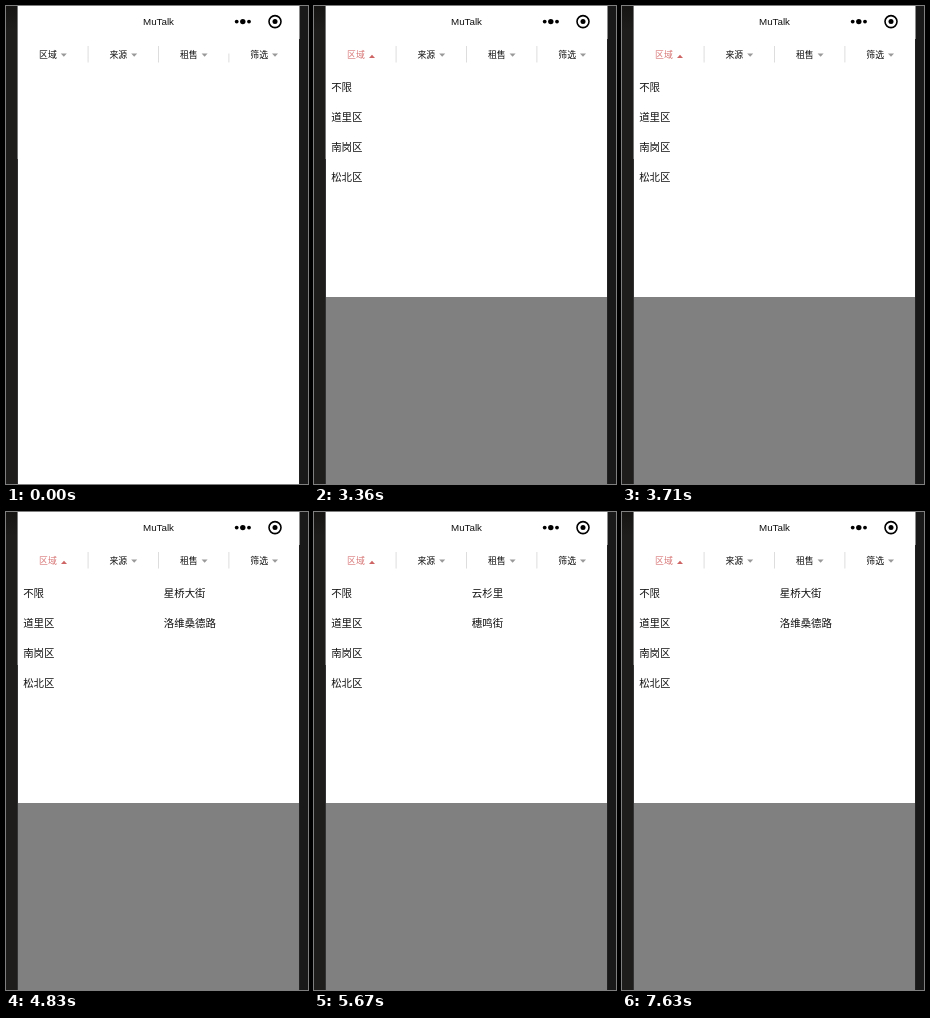
An HTML page that plays this animation: 302x478 px, repeating every 8 s.

```html
<!DOCTYPE html>
<html lang="zh-CN">
<head>
<meta charset="utf-8">
<style>
html, body { margin: 0; width: 100%; height: 100%; overflow: hidden; background: #fff; }
svg { display: block; }
text { font-family: "Noto Sans CJK SC", "Noto Sans CJK", sans-serif; fill: #111; }
.title { font: 9.8px "Liberation Sans", Arial, sans-serif; text-anchor: middle; }
.tab { font-size: 8.9px; }
.item { font-size: 10.45px; }
</style>
</head>
<body>
<svg id="stage" width="302" height="478" viewBox="0 0 302 478">
  <defs>
    <linearGradient id="edge" x2="0" y2="1">
      <stop offset="0" stop-color="#161514"/>
      <stop offset=".05" stop-color="#1f1d1c"/>
      <stop offset="1" stop-color="#1f1d1b"/>
    </linearGradient>
  </defs>
  <rect width="302" height="478" fill="#fff"/>
  <text class="title" x="152.5" y="18.7">MuTalk</text>
  <circle cx="230.7" cy="15.6" r="1.9"/>
  <circle cx="236.8" cy="15.6" r="2.7"/>
  <circle cx="243" cy="15.6" r="1.9"/>
  <circle cx="269" cy="15.6" r="6" fill="none" stroke="#000" stroke-width="1.6"/>
  <circle cx="269" cy="15.6" r="2.5"/>
  <g id="tabs"></g>
  <g id="panel">
    <rect x="11" y="291" width="283" height="187" fill="#808080"/>
    <g id="districts"></g>
    <g id="streets"></g>
  </g>
  <rect width="11" height="478" fill="url(#edge)"/>
  <rect x="11" width="1" height="153" fill="#777"/>
  <rect x="11" y="153" width="1" height="325" fill="#333"/>
  <rect x="293.5" width="8.5" height="478" fill="#191919"/>
  <rect x="293" y="33" width="1" height="445" fill="#222"/>
</svg>
<script>
const LOOP = 8000, OPEN = 3360;
const $ = id => document.getElementById(id);

const dao = ['星桥大街', '洛维桑德路'];
const nan = ['云杉里', '穗鸣街'];
const song = ['榆光大道', '市政府'];
const picks = [[0, []], [4830, dao], [5670, nan], [6580, song], [7630, dao]];

const column = (words, x, y, step) => words.map((word, i) =>
  `<text class="item" x="${x}" y="${y + i * step}">${word}</text>`).join('');

function drawTabs(open, settled) {
  $('tabs').innerHTML = ['区域', '来源', '租售', '筛选'].map((word, i) => {
    const x = 33.1 + i * 70.4, active = open && !i;
    const color = active ? '#d87878' : '#111';
    const arrow = active ? 'M55 52h6l-3-3.2z' : `M${x + 21.7} 47.6h6l-3 3.2z`;
    const top = i === 2 && !settled ? 47.5 : 40;
    const line = i < 3
      ? `<path d="M${82.1 + i * 70.4} ${top}V56.5" stroke="#ddd"/>` : '';
    return `<text class="tab" x="${x}" y="52.3" style="fill:${color}">${word}</text>
      <path d="${arrow}" fill="${active ? '#cf6464' : '#999'}"/>${line}`;
  }).join('');
}

$('districts').innerHTML = column(['不限', '道里区', '南岗区', '松北区'], 17.2, 84.8, 30);

let shown;
function frame(now) {
  const t = now % LOOP;
  const open = t >= OPEN, settled = t >= 140;
  const pick = picks.filter(p => t >= p[0]).pop();
  const state = [open, settled, pick[0]].join();
  if (state !== shown) {
    shown = state;
    drawTabs(open, settled);
    $('panel').style.display = open ? '' : 'none';
    $('streets').innerHTML = column(pick[1], 157.8, 84.8, 30.6);
  }
  requestAnimationFrame(frame);
}
frame(0);
</script>
</body>
</html>
```
